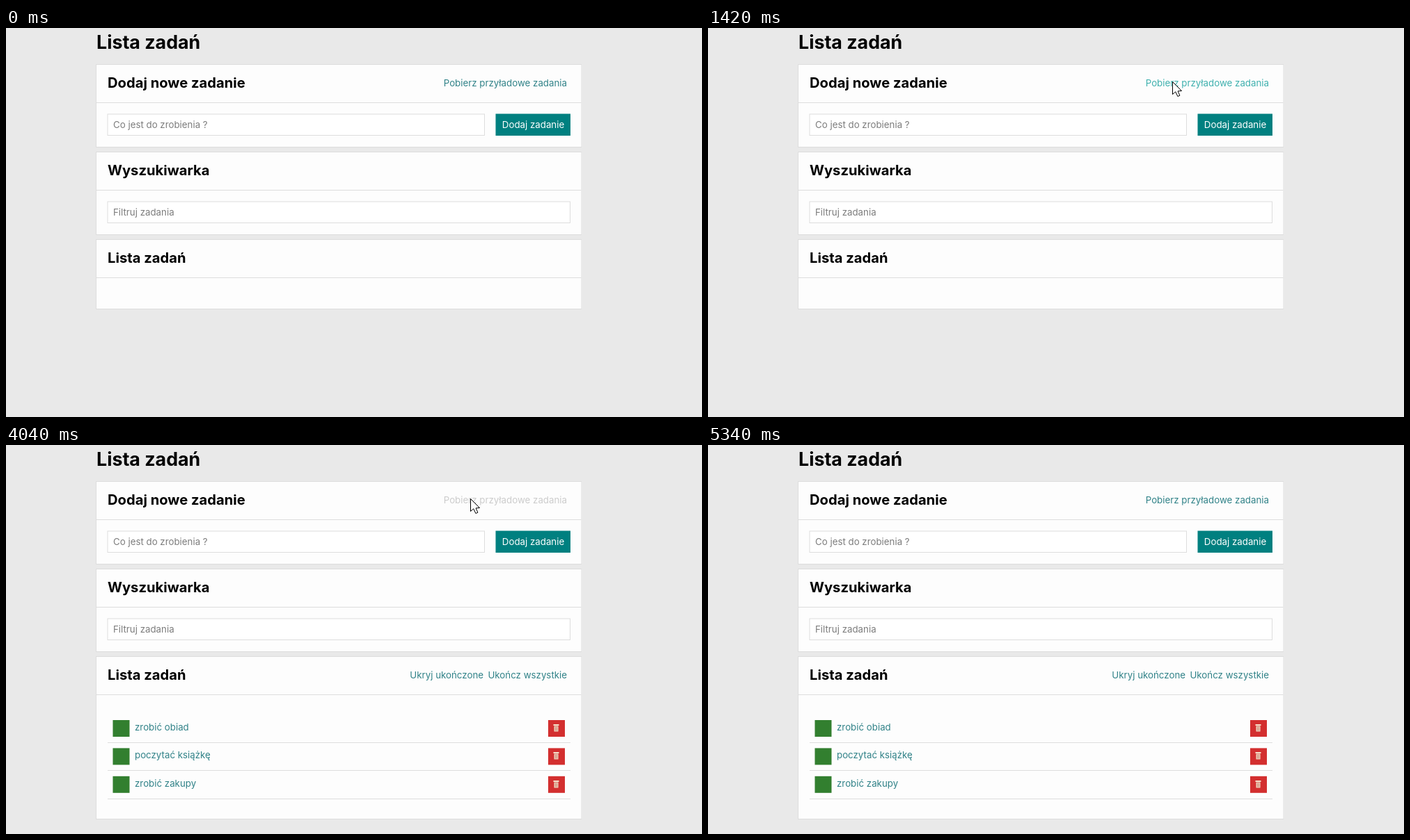
These frames come from a looping animation (1000x560 px, 6 s). An HTML page with a canvas:

```html
<!DOCTYPE html>
<html lang="pl">
<head>
<meta charset="utf-8">
<title>Lista zadań</title>
<style>
html, body { margin: 0; width: 100%; height: 100%; overflow: hidden; background: #e9e9e9; }
canvas { display: block; }
</style>
</head>
<body>
<canvas id="stage" width="1000" height="560"></canvas>
<script>
const ctx = document.getElementById('stage').getContext('2d');
const LOOP = 6000;
const STEP = 72;

const TEAL = [48, 130, 136];
const HOVER = [62, 176, 174];
const ACTIVE = [96, 196, 194];
const GREY = [204, 204, 204];
const LINE = '#dddddd';
const PAPER = '#fdfdfd';

// The screen refreshes in even steps inside these spans and rests between them.
const BUSY = [[400, 940], [1020, 1420], [1620, 2100], [4040, 4460], [4790, 5340]];

const ENTER = [882, 506], NEAR = [674, 96], ON_LINK = [667, 77], OFF_LINK = [690, 127], EXIT = [924, 545];

const rgb = c => `rgb(${c.map(Math.round).join(',')})`;
const clamp = u => Math.min(1, Math.max(0, u));
const mix = (a, b, u) => a.map((v, i) => v + (b[i] - v) * u);
const progress = (t, from, to) => clamp((t - from) / (to - from));
const easeOut = u => 1 - (1 - u) ** 1.28;
const easeIn = u => u ** 1.08;

function heldTime(time) {
  const span = BUSY.filter(([from]) => from <= time).pop();
  if (!span) return 0;
  const [from, to] = span;
  return time >= to ? to : from + Math.floor((time - from) / STEP) * STEP;
}

function pointerAt(t) {
  if (t < 1000) return mix(ENTER, NEAR, easeOut(progress(t, 400, 940)));
  if (t < 4700) return mix(NEAR, ON_LINK, progress(t, 980, 1090));
  return mix(OFF_LINK, EXIT, easeIn(progress(t, 4790, 5270)));
}

function linkColor(t) {
  if (t < 1600) return mix(TEAL, HOVER, progress(t, 1020, 1420));
  if (t < 1780) return mix(HOVER, ACTIVE, progress(t, 1620, 1780));
  if (t < 4000) return mix(ACTIVE, GREY, progress(t, 1780, 2100));
  if (t < 4700) return mix(GREY, HOVER, progress(t, 4040, 4460));
  return mix(HOVER, TEAL, progress(t, 4770, 5140));
}

function rect(x, y, w, h, color) {
  ctx.fillStyle = color;
  ctx.fillRect(x, y, w, h);
}

function text(str, x, y, color, align = 'left', font = '400 13.3px') {
  ctx.font = `${font} Inter, sans-serif`;
  ctx.textAlign = align;
  ctx.fillStyle = color;
  ctx.fillText(str, x, y);
}

function panel(title, y, h) {
  rect(129, y - 1, 698, h + 2, LINE);
  rect(130, y, 696.5, h, PAPER);
  rect(130, y + 54, 696.5, 1, LINE);
  text(title, 146, y + 33, '#000', 'left', '700 20.2px');
}

function input(hint, y, w) {
  rect(145.5, y, w, 31.5, LINE);
  rect(146.5, y + 1, w - 2, 29.5, '#fff');
  text(hint, 154, y + 20.5, '#7c7c7c');
}

function bin(x, y) {
  rect(x - 4, y - 5, 8, 2, '#f4dfc8');
  rect(x - 3, y - 2.5, 6, 8, '#f0d6c0');
  for (const dx of [-1.5, 0.5]) rect(x + dx, y - 1.5, 1, 6, '#c9806c');
}

function taskList() {
  const teal = rgb(TEAL);
  text('Ukryj ukończone', 686, 336, teal, 'right');
  text('Ukończ wszystkie', 806, 336, teal, 'right');
  ['zrobić obiad', 'poczytać książkę', 'zrobić zakupy'].forEach((task, i) => {
    const y = 396 + i * 40.4;
    rect(153.5, y, 24, 24, '#327f2f');
    text(task, 185, y + 15, teal);
    rect(779, y, 24, 24, '#d32f2f');
    bin(790.5, Math.round(y) + 11);
    rect(146, Math.round(y + 32), 665, 1, LINE);
  });
}

function arrow(x, y) {
  const shape = [[0, 0], [0, 18], [4.2, 14.3], [7.4, 21], [10.4, 19.7], [7.6, 13.4], [13, 13]];
  ctx.beginPath();
  shape.forEach(([dx, dy]) => ctx.lineTo(x + 0.5 + dx, y + 0.5 + dy));
  ctx.closePath();
  ctx.fillStyle = '#fff';
  ctx.fill();
  ctx.strokeStyle = '#000';
  ctx.lineWidth = 1;
  ctx.stroke();
}

function beam(x, y) {
  rect(x - 1, y - 9, 2, 18, '#000');
  for (const dy of [-10, 8]) {
    rect(x - 5.5, y + dy, 5, 2, '#000');
    rect(x + 0.5, y + dy, 5, 2, '#000');
  }
}

function pointer(t) {
  if (t < 400 || t >= 5340) return;
  const [x, y] = pointerAt(t).map(Math.round);
  const overFilter = x > 146 && x < 811 && y >= 246 && y <= 281;
  (overFilter ? beam : arrow)(x, y);
}

function draw(now) {
  const t = heldTime(now % LOOP);
  const loaded = t >= 4040;
  const loading = t >= 1780 && !loaded;

  rect(0, 0, 1000, 560, '#e9e9e9');
  text('Lista zadań', 130, 30, '#000', 'left', '700 26.8px');

  panel('Dodaj nowe zadanie', 53, 118);
  text(loading ? 'Ładowanie...' : 'Pobierz przyładowe zadania', 806, 84, rgb(linkColor(t)), 'right');
  input('Co jest do zrobienia ?', 123.5, 542.5);
  rect(703.5, 123.5, 107.5, 31.5, '#008080');
  text('Dodaj zadanie', 757.5, 144, '#fff', 'center');

  panel('Wyszukiwarka', 179, 118);
  input('Filtruj zadania', 249.5, 665.5);

  panel('Lista zadań', 305, loaded ? 233 : 99);
  if (loaded) taskList();

  pointer(t);
}

const start = performance.now();
function frame() {
  draw(performance.now() - start);
  requestAnimationFrame(frame);
}
frame();
</script>
</body>
</html>
```
